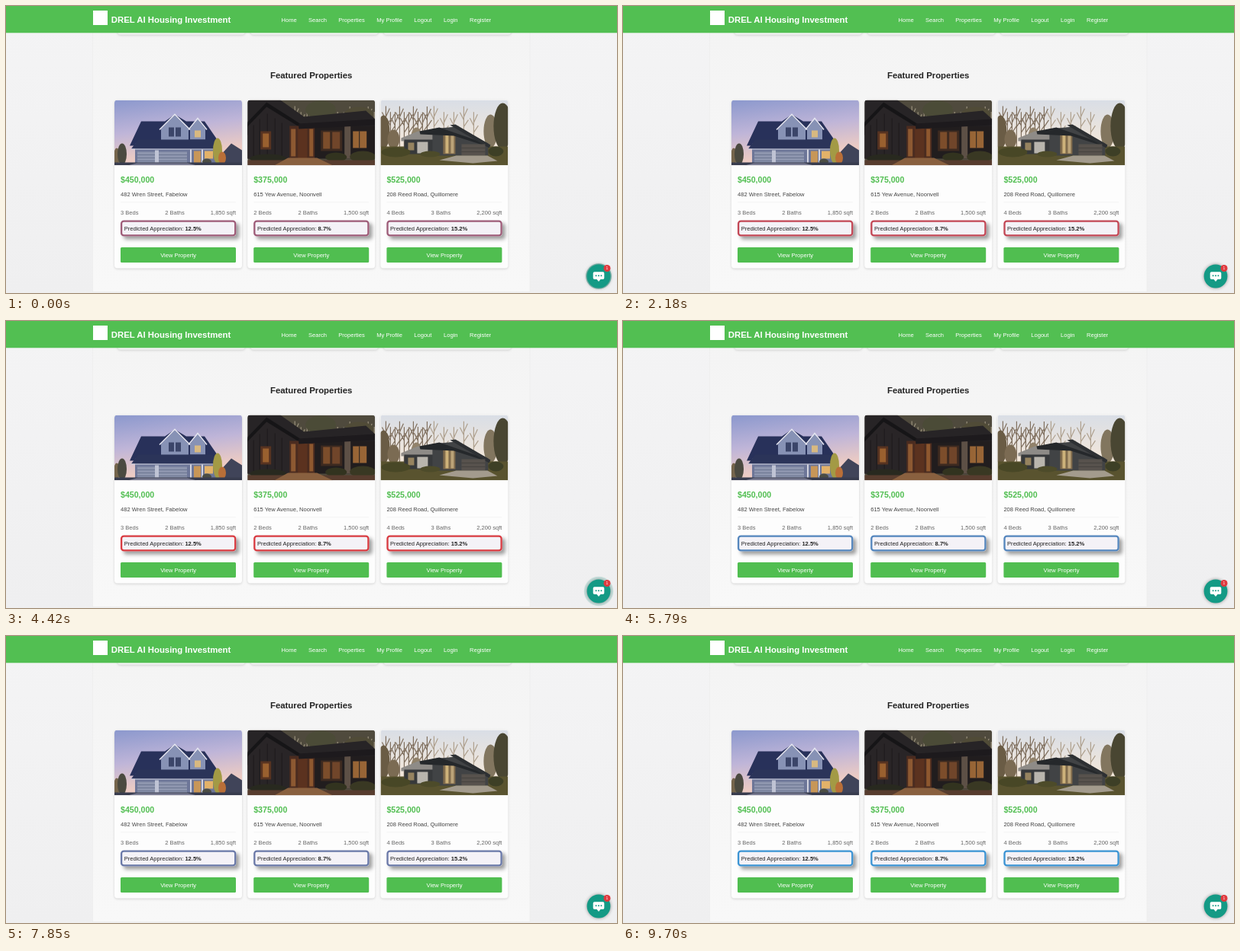
An HTML page that plays this animation: 800x377 px, repeating every 9.73 s.

```html
<!DOCTYPE html>
<html lang="en">
<head>
<meta charset="utf-8">
<title>Featured Properties</title>
<style>
  html, body { margin: 0; width: 100%; height: 100%; overflow: hidden; background: #f0f0f1; }
  svg { display: block; width: 800px; height: 377px; font: 7.55px "Liberation Sans", Arial, sans-serif; }
  .bold { font-weight: bold; }
  .mid { text-anchor: middle; }
  .end { text-anchor: end; }
  .card { filter: drop-shadow(0 1px 1.5px rgba(0, 0, 0, .15)); }
  .lift { filter: drop-shadow(4.5px 4px 2.5px rgba(0, 0, 0, .38)); }
  .float { filter: drop-shadow(0 .5px 2px rgba(0, 0, 0, .4)); }
</style>
</head>
<body>
<svg viewBox="0 0 800 377">
  <defs>
    <linearGradient id="page" x2="0" y2="1"><stop stop-color="#f4f4f5"/><stop offset="1" stop-color="#efeff0"/></linearGradient>
    <linearGradient id="panel" x2="0" y2="1"><stop stop-color="#f4f4f4"/><stop offset="1" stop-color="#f8f8f8"/></linearGradient>
    <linearGradient id="dusk" x2=".25" y2="1"><stop stop-color="#8b98cd"/><stop offset=".5" stop-color="#bfb5d8"/><stop offset=".9" stop-color="#eccbc3"/></linearGradient>
    <linearGradient id="dawn" x2="0" y2="1"><stop stop-color="#d9dee6"/><stop offset=".65" stop-color="#f1e6da"/></linearGradient>
    <clipPath id="photo"><path d="M0 85.7V4Q0 0 4 0H163Q167 0 167 4V85.7Z"/></clipPath>
  </defs>
  <rect width="800" height="377" fill="url(#page)"/>
  <rect x="113.5" y="30" width="572.5" height="345.5" fill="url(#panel)" stroke="#ebebec" stroke-width=".6"/>
  <g id="cards"></g>
  <text class="bold mid" x="399.7" y="95" font-size="11.38" fill="#222">Featured Properties</text>
  <rect width="800" height="35.3" fill="#52bf52"/>
  <rect x="114" y="6" width="19" height="19" fill="#fff"/>
  <g id="nav" fill="#fff">
    <text class="bold" x="137.8" y="22" font-size="11.36">DREL AI Housing Investment</text>
  </g>
  <circle id="pulse" cx="776" cy="355" fill="#149a85"/>
  <circle class="float" cx="776" cy="355" r="15.4" fill="#149a85"/>
  <path d="M770.5 349.3H781.5Q783.3 349.3 783.3 351V357.3Q783.3 359 781.5 359H778.5L776 362L773.5 359H770.5Q768.7 359 768.7 357.3V351Q768.7 349.3 770.5 349.3Z" fill="#fff"/>
  <path d="M772.6 354.2h.01M776 354.2h.01M779.4 354.2h.01" stroke="#149a85" stroke-width="2" stroke-linecap="round"/>
  <circle cx="787" cy="344.5" r="4.5" fill="#e0393e"/>
  <text class="mid" x="787" y="346.4" font-size="5" fill="#fff">1</text>
</svg>
<script>
const LOOP = 9730;
const BLUE = [52, 152, 219], RED = [222, 56, 60];
const $ = id => document.getElementById(id);
const text = (x, y, str, fill, attrs = '') => `<text x="${x}" y="${y}" fill="${fill}" ${attrs}>${str}</text>`;
const shape = (fill, d) => `<path fill="${fill}" d="${d}"/>`;
const lines = (stroke, width, d) => `<path d="${d}" stroke="${stroke}" stroke-width="${width}" fill="none"/>`;
const box = (x, y, w, h, fill, r = 0) => `<rect x="${x}" y="${y}" width="${w}" height="${h}" fill="${fill}" rx="${r}"/>`;
const tree = (x, base, h, w, fill) => `<ellipse cx="${x}" cy="${base - h / 2}" rx="${w}" ry="${h / 2}" fill="${fill}"/>`;

// Bare trunks with a few branches
const trunks = (x0, x1, step, fill) => {
  let d = '';
  for (let x = x0, i = 0; x < x1; x += step, i++) {
    const top = 8 + 9 * Math.abs(Math.sin(i * 2.1));
    d += `M${x} 62V${top}M${x} ${top + 18}l-5 -10M${x} ${top + 14}l5 -11M${x} ${top + 27}l6 -9`;
  }
  return lines(fill, 1.2, d);
};

const gabledHouse = () =>
  box(0, 0, 167, 86, 'url(#dusk)') +
  tree(3, 85, 22, 4, '#75654c') + tree(10, 85, 28, 6, '#4b4a40') +
  shape('#404459', 'M143 84V68L153 57L167 66V84Z') +
  shape('#28315a', 'M20 60L35 28H66L79 19L94 28H118L140 60Z') +
  box(27, 57, 112, 27, '#6d7698') +
  shape('#8792b5', 'M61 55V38L79 20L97 38V55Z') +
  shape('#8792b5', 'M99 38L109 25L119 38V52H99Z') +
  lines('#e3e4ef', 1.6, 'M59 39L79 19L99 39M97 39L109 24L121 39') +
  box(71, 36, 7, 12, '#3b4569') + box(80, 36, 7, 12, '#3b4569') + box(105, 40, 8, 9, '#d8b981') +
  shape('#2b3459', 'M22 64L31 52H128L140 62V65Z') +
  lines('#d7d9e6', 1, 'M22 64.5H140') +
  box(30, 68, 23, 16, '#8d95ae') + box(58, 68, 37, 16, '#8d95ae') +
  lines('#626c89', .7, 'M30 72H95M30 76H95M30 80H95') +
  box(53, 66, 5, 18, '#bfc3d4') +
  box(104, 67, 9, 17, '#c79658') + box(118, 67, 11, 10, '#e3b269') +
  lines('#dedee8', 1.8, 'M100 65V84M115 65V84') +
  tree(135, 83, 33, 6, '#a39a45') + tree(141, 84, 16, 5, '#b96f38') + tree(121, 85, 8, 6, '#4b4d44') +
  shape('#383c4e', 'M0 82H167V86H0Z') + shape('#797b91', 'M29 83H96L108 86H17Z');

const darkHouse = () =>
  box(0, 0, 167, 86, '#4f4a3d') +
  trunks(62, 167, 8, '#99907b') +
  tree(96, 25, 24, 20, '#4b4b37') + tree(146, 27, 18, 19, '#504b37') +
  shape('#272426', 'M0 0H43L74 22L155 14L167 25V46H0Z') +
  box(0, 34, 167, 43, '#211d1e') +
  shape('#292527', 'M0 31L25 7L69 33V77H0Z') +
  shape('#161517', 'M0 29L25 3L75 35L72 38L25 9L0 35Z') +
  lines('#1e1a1c', 1, 'M8 33V77M16 25V77M26 18V77M36 24V77M45 30V77') +
  box(17, 41, 14, 24, '#573321') + box(20, 44, 8, 18, '#99602f') +
  box(55, 34, 33, 43, '#4b2c20') + box(57, 38, 6, 36, '#8d5932') + box(66, 36, 12, 41, '#5b321f') + box(81, 38, 5, 36, '#8e582f') +
  box(96, 40, 28, 27, '#3d2a20') + box(99, 42, 9, 22, '#7c4d2b') + box(111, 42, 10, 22, '#70452a') +
  box(127, 34, 8, 43, '#5d5046') + box(138, 41, 18, 22, '#986536') + box(146, 41, 1, 22, '#211d1e') +
  shape('#1d1a1d', 'M67 31L167 25V33L67 38Z') +
  tree(116, 81, 12, 14, '#32331f') + tree(151, 82, 15, 17, '#393823') + tree(27, 83, 12, 24, '#28291f') +
  shape('#573c2e', 'M0 79H167V86H0Z') + shape('#89603f', 'M53 76H91L112 86H35Z');

const modernHouse = () =>
  box(0, 0, 167, 86, 'url(#dawn)') +
  trunks(7, 62, 6, '#80705f') + trunks(70, 130, 13, '#aea08e') +
  tree(144, 63, 44, 9, '#82765f') + tree(160, 65, 61, 12, '#494632') +
  tree(4, 64, 44, 8, '#6a5c45') + tree(17, 64, 25, 8, '#7b6b53') + tree(47, 60, 24, 7, '#91826b') +
  box(0, 61, 167, 25, '#59532f') +
  shape('#8e8b87', 'M27 50L49 41L89 44V54H27Z') +
  box(31, 52, 48, 19, '#37393b') + box(36, 56, 8, 10, '#96835f') + box(48, 55, 14, 15, '#b9b5ad') +
  shape('#414345', 'M68 38L99 35L141 57V73H68Z') +
  shape('#806b4c', 'M82 45H98V71H82Z') + box(85, 43, 4, 27, '#cdb27a') + box(92, 43, 4, 27, '#bba378') +
  shape('#25282b', 'M51 41L77 36L143 59V62L96 47L52 45Z') +
  shape('#2d3033', 'M91 33L98 32L144 59L142 63Z') +
  box(106, 58, 31, 15, '#57524d') + lines('#403d3a', .7, 'M106 63H137M106 68H137') +
  tree(20, 75, 13, 19, '#484726') + tree(65, 75, 8, 13, '#4d4b2a') + tree(151, 74, 13, 10, '#3d3f26') +
  shape('#a39b8d', 'M99 73H140L153 80L121 83L77 79Z');

const homes = [
  [gabledHouse, '$450,000', '482 Wren Street, Fabelow', 3, 2, '1,850', '12.5%'],
  [darkHouse, '$375,000', '615 Yew Avenue, Noonvell', 2, 2, '1,500', '8.7%'],
  [modernHouse, '$525,000', '208 Reed Road, Quillomere', 4, 3, '2,200', '15.2%'],
];

$('cards').innerHTML = homes.map(([draw, price, address, beds, baths, area, gain], i) => `
  <g transform="translate(${142 + i * 174.2} 123.5)">
    <rect class="card" x="4" y="-110" width="167" height="24" rx="4" fill="#f5f5f5"/>
    <rect class="card" width="167" height="221" rx="4" fill="#fdfdfd"/>
    <g clip-path="url(#photo)">${draw()}</g>
    ${text(8, 108.7, price, '#50be50', 'class="bold" font-size="10.6"')}
    ${text(8, 126.5, address, '#444')}
    <path d="M8 134.2H159" stroke="#eee" stroke-width=".6"/>
    ${text(8, 150.5, beds + ' Beds', '#666')}
    ${text(79, 150.5, baths + ' Baths', '#666', 'class="mid"')}
    ${text(159, 150.5, area + ' sqft', '#666', 'class="end"')}
    <rect class="lift" x="8" y="158" width="151.3" height="21" rx="4" fill="#f4f2f7"/>
    <rect class="frame" x="9.1" y="159.1" width="149.1" height="18.8" rx="3.2" fill="#f4f2f7" stroke-width="2.3"/>
    ${text(12.7, 171, `Predicted Appreciation: <tspan class="bold">${gain}</tspan>`, '#222')}
    ${box(8, 193.5, 151, 20, '#50be50', 1.5)}
    ${text(83.6, 206, 'View Property', '#fff', 'class="mid"')}
  </g>`).join('');

const links = { Home: 360.5, Search: 396, Properties: 435.3, 'My Profile': 485.3, Logout: 534.3, Login: 573, Register: 607 };
$('nav').innerHTML += Object.entries(links).map(([label, x]) => text(x, 20.7, label, '#fff')).join('');

// CSS "ease": cubic-bezier(.25, .1, .25, 1)
function ease(x) {
  const curve = (u, a, b) => 3 * (1 - u) ** 2 * u * a + 3 * (1 - u) * u * u * b + u ** 3;
  let lo = 0, hi = 1;
  for (let i = 0; i < 20; i++) {
    const u = (lo + hi) / 2;
    if (curve(u, .25, .25) < x) lo = u; else hi = u;
  }
  return curve(lo, .1, 1);
}

const frames = document.querySelectorAll('.frame');
const pulse = $('pulse');

function render(t) {
  // Border swings blue to red and back every two seconds
  const phase = (t + 360) % 2000 / 1000;
  const red = phase < 1 ? ease(phase) : 1 - ease(phase - 1);
  const color = `rgb(${BLUE.map((c, i) => Math.round(c + (RED[i] - c) * red))})`;
  frames.forEach(f => f.setAttribute('stroke', color));

  // Three one-second pulses, then a two-second rest
  const cycle = (t + 1150) % 5000;
  const p = cycle < 3000 ? Math.min(1, cycle % 1000 / 800) : 1;
  pulse.setAttribute('r', 15.5 + 4 * (1 - (1 - p) ** 2));
  pulse.setAttribute('opacity', .6 * (1 - p));
}

const start = performance.now();
(function tick() {
  render((performance.now() - start) % LOOP);
  requestAnimationFrame(tick);
})();
</script>
</body>
</html>
```
